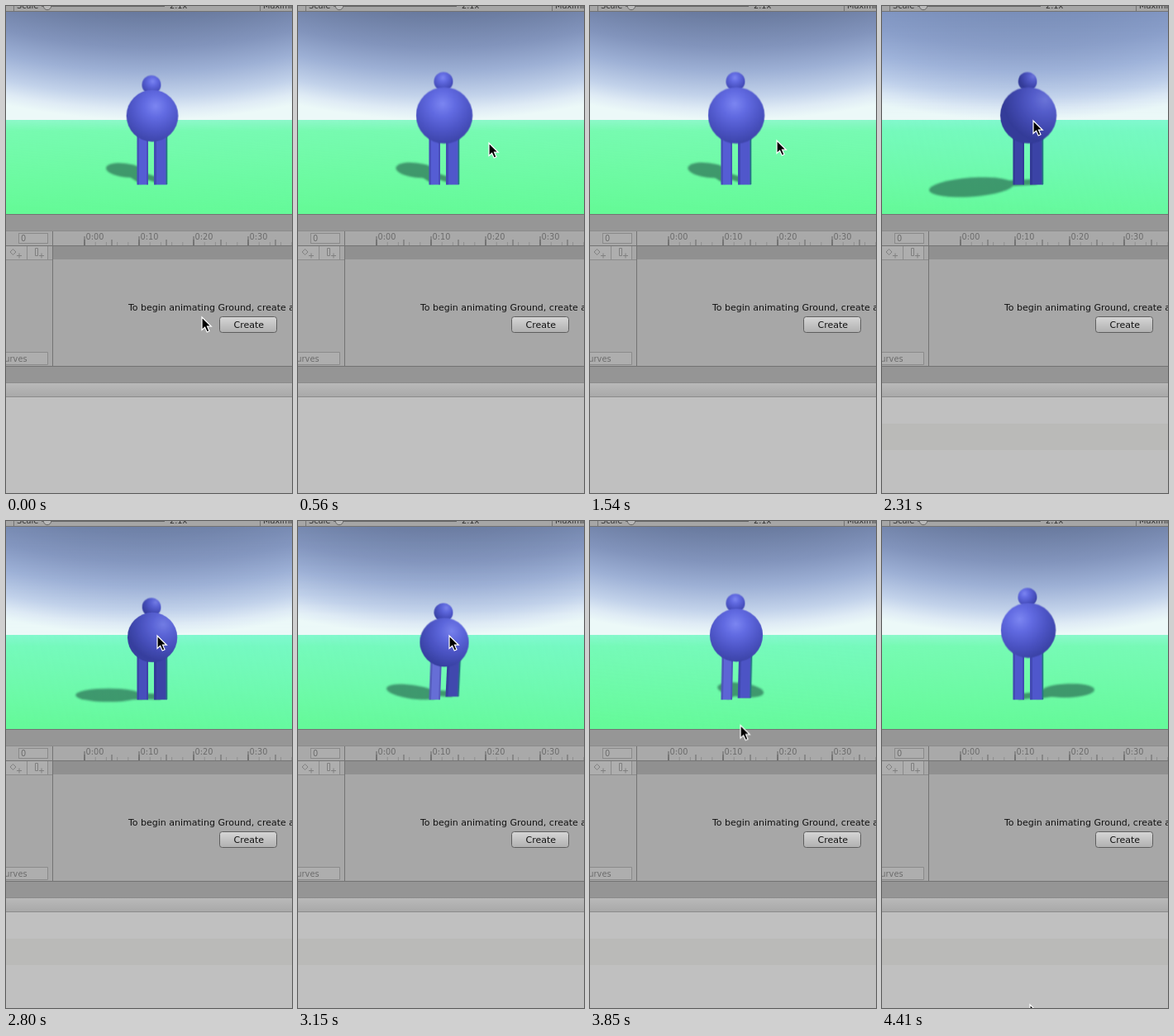
These frames come from a looping animation (346 px wide and 590 px high, 4480 ms). An HTML page:

```html
<!DOCTYPE html>
<html lang="en">
<head>
<meta charset="utf-8">
<title>Editor scene</title>
<style>
  html, body { margin: 0; width: 100%; height: 100%; overflow: hidden; background: #c0c0c0; }
  svg { display: block; width: 346px; height: 590px; }
  text { font: 9.8px "DejaVu Sans", sans-serif; fill: #6c6c6c; }
  text.top { fill: #333; }
  text.main { font-size: 11px; fill: #111; }
  .edge { stroke: #737373; }
  .thin { stroke: #8b8b8b; fill: none; }

  .move { animation: 4480ms linear infinite; }
  #body { animation-name: body; }
  #head { animation-name: head; }
  .glow { animation-name: glow; }
  .shade { animation-name: shade; }
  #legL { animation-name: legL; transform-origin: 165px 217px; }
  #legR { animation-name: legR; transform-origin: 187px 217px; }
  #blob { animation-name: blob; }
  #bars { animation-name: bars; }
  #haze { animation-name: haze; }
  #teal { animation-name: teal; }
  #cursor { animation-name: cursor; }
  #strip { animation-name: strip; animation-timing-function: step-end; }

  @keyframes body {
    0% { transform: translate(177px, 133px) scale(.98); }
    12.5%, 51.56% { transform: translate(177px, 132.5px) scale(1.07); }
    62.5% { transform: translate(177px, 141px) scale(.945); }
    76.56% { transform: translate(177px, 152px) scale(.915); }
    90%, 100% { transform: translate(177px, 132.5px) scale(1.04); }
  }
  @keyframes head {
    0% { transform: translate(176px, 95.5px); }
    12.5%, 51.56% { transform: translate(176px, 91.5px); }
    62.5% { transform: translate(176px, 104.5px); }
    76.56% { transform: translate(176px, 116px); }
    90%, 100% { transform: translate(176px, 92.5px); }
  }
  @keyframes glow {
    0% { transform: translate(4px, -12px); }
    12.5%, 37.5% { transform: translate(-2px, -13px); }
    51.56% { transform: translate(19px, -18px); }
    62.5% { transform: translate(14px, -17px); }
    76.56% { transform: translate(6px, -14px); }
    98.44%, 100% { transform: translate(-10px, -13px); }
  }
  @keyframes shade {
    0%, 37.5% { opacity: 0; }
    51.56% { opacity: .16; }
    62.5% { opacity: .08; }
    76.56%, 100% { opacity: 0; }
  }
  @keyframes legL {
    0%, 37.5% { transform: none; fill: #555dd4; }
    51.56% { transform: none; fill: #3b43a6; }
    62.5% { transform: none; fill: #474fbc; }
    76.56% { transform: skewX(-4deg); fill: #7f86ea; }
    90%, 100% { transform: none; fill: #4f57cc; }
  }
  @keyframes legR {
    0%, 37.5% { transform: none; fill: #5057cb; }
    51.56%, 62.5% { transform: none; fill: #3b43a6; }
    76.56% { transform: translate(-1px, -6.5px) skewX(-5deg); fill: #444cb4; }
    90%, 100% { transform: none; fill: #4f57cc; }
  }
  @keyframes blob {
    0% { transform: translate(144px, 199px) rotate(7deg) scale(.58, .8); }
    12.5%, 37.5% { transform: translate(143px, 199px) rotate(7deg) scale(.62, .85); }
    51.56% { transform: translate(108px, 219.5px) rotate(-4deg) scale(1.28, 1.1); }
    62.5% { transform: translate(124px, 211px) scale(1, .78); }
    76.56% { transform: translate(150px, 204px) rotate(14deg) scale(.63, .82); }
    98.44%, 100% { transform: translate(225px, 205.5px) rotate(-2deg) scale(.8, .8); }
  }
  @keyframes bars {
    0%, 37.5% { d: path("M165 213L144 199M187 212L146 199"); }
    51.56% { d: path("M165 214L120 218M187 213L120 217"); }
    62.5% { d: path("M165 213L124 211M187 213L126 211"); }
    76.56% { d: path("M165 213L150 204M186 207L152 203"); }
    98.44%, 100% { d: path("M165 213L222 207M187 212L222 207"); }
  }
  @keyframes haze {
    0%, 37.5% { opacity: 0; }
    51.56% { opacity: .4; }
    62.5% { opacity: .12; }
    76.56%, 100% { opacity: 0; }
  }
  @keyframes teal {
    0%, 37.5% { opacity: .35; }
    51.56%, 76.56% { opacity: 1; }
    98.44%, 100% { opacity: .5; }
  }
  @keyframes cursor {
    0% { transform: translate(237px, 377px); animation-timing-function: ease-in-out; }
    12.5%, 25% { transform: translate(231px, 166px); animation-timing-function: ease-in-out; }
    33%, 39% { transform: translate(226px, 163px); animation-timing-function: ease-in-out; }
    50%, 79.5% { transform: translate(183px, 139px); animation-timing-function: ease-in-out; }
    98.44%, 100% { transform: translate(179px, 586px); }
  }
  @keyframes strip {
    0% { opacity: 0; }
    50.7%, 100% { opacity: 1; }
  }
</style>
</head>
<body>
<svg viewBox="0 0 346 590">
  <defs>
    <!-- Centred far above the view, so the bands sag gently -->
    <radialGradient id="sky" gradientUnits="userSpaceOnUse" cx="173" cy="-700" r="838">
      <stop offset=".8425" stop-color="#68799d"/>
      <stop offset=".895" stop-color="#8294bc"/>
      <stop offset=".93" stop-color="#9db0d5"/>
      <stop offset=".965" stop-color="#c2d2ea"/>
      <stop offset=".985" stop-color="#dfebf5"/>
      <stop offset="1" stop-color="#ecf9f8"/>
    </radialGradient>
    <linearGradient id="hazeFade" x2="0" y2="1">
      <stop offset="0" stop-color="#94afe4"/>
      <stop offset="1" stop-color="#b4cbf0" stop-opacity="0"/>
    </linearGradient>
    <linearGradient id="ground" x2="0" y2="1">
      <stop offset="0" stop-color="#94f8c8"/>
      <stop offset=".12" stop-color="#78fbaa"/>
      <stop offset="1" stop-color="#64fa95"/>
    </linearGradient>
    <linearGradient id="tealFade" x1=".35" y1="1" x2=".65" y2="0">
      <stop offset="0" stop-color="#6cf8c8" stop-opacity=".1"/>
      <stop offset="1" stop-color="#74f8d4" stop-opacity=".6"/>
    </linearGradient>
    <linearGradient id="button" x2="0" y2="1">
      <stop offset="0" stop-color="#d6d6d6"/>
      <stop offset="1" stop-color="#b0b0b0"/>
    </linearGradient>
    <linearGradient id="bar" x2="0" y2="1">
      <stop offset="0" stop-color="#b9b9b9"/>
      <stop offset="1" stop-color="#a8a8a8"/>
    </linearGradient>
    <radialGradient id="light">
      <stop offset="0" stop-color="#7c86f2"/>
      <stop offset=".3" stop-color="#626be2"/>
      <stop offset=".65" stop-color="#4d55c6"/>
      <stop offset="1" stop-color="#3b43a6"/>
    </radialGradient>
    <clipPath id="ball"><circle r="32"/></clipPath>
    <clipPath id="view"><rect y="7" width="346" height="245"/></clipPath>
    <filter id="soft" x="-20%" y="-40%" width="140%" height="180%"><feGaussianBlur stdDeviation=".9"/></filter>
  </defs>

  <!-- Scene view -->
  <g clip-path="url(#view)">
    <rect y="6" width="346" height="133" fill="url(#sky)"/>
    <rect id="haze" class="move" y="6" width="346" height="133" fill="url(#hazeFade)"/>
    <rect y="138" width="346" height="114" fill="url(#ground)"/>
    <rect id="teal" class="move" y="138" width="346" height="114" fill="url(#tealFade)"/>
    <g opacity=".62" filter="url(#soft)" fill="#245c49">
      <ellipse id="blob" class="move" rx="40" ry="10.5"/>
      <path id="bars" class="move" d="M165 213L144 199M187 212L146 199" stroke="#245c49" stroke-width="7"/>
    </g>
    <g id="legR" class="move">
      <path d="M179 150h16v66.5h-16z"/>
      <path d="M179 150h3v66.5h-3z" fill="#1c2468" opacity=".25"/>
      <path d="M193.500 150h1.800v66h-1.800z" fill="#237782"/>
    </g>
    <g id="legL" class="move">
      <path d="M158.500 150h13.500v66.500h-13.500z"/>
      <path d="M158.500 150h2.500v66.500h-2.500zM170 150h2v66.500h-2z" fill="#1c2468" opacity=".25"/>
    </g>
    <g id="head" class="move">
      <g transform="scale(.36)" clip-path="url(#ball)">
        <circle r="32" fill="#3b43a6"/>
        <circle class="move glow" r="47" fill="url(#light)"/>
        <circle class="move shade" r="33" fill="#151c55"/>
      </g>
    </g>
    <g id="body" class="move">
      <g clip-path="url(#ball)">
        <circle r="32" fill="#3b43a6"/>
        <circle class="move glow" r="47" fill="url(#light)"/>
        <circle class="move shade" r="33" fill="#151c55"/>
      </g>
    </g>
  </g>

  <!-- Top toolbar -->
  <rect width="346" height="6" fill="#a6a6a6"/>
  <path class="edge" d="M0 6.500h346M9.500 0v6M307.500 0v6"/>
  <path d="M43 .5h149" stroke="#666"/>
  <circle cx="50" cy="0" r="4.700" fill="#b9b9b9" stroke="#666"/>
  <text class="top" x="-5" y="3">▾</text>
  <text class="top" x="13" y="3">Scale</text>
  <text class="top" x="198" y="3">2.1x</text>
  <text class="top" x="311" y="3">Maximize</text>

  <!-- Timeline -->
  <rect y="252" width="346" height="21" fill="#969696"/>
  <path class="edge" d="M0 252.500h346"/>
  <rect y="272" width="346" height="18" fill="#a9a9a9"/>
  <path class="thin" d="M0 272.500h346"/>
  <rect x="15.500" y="275.500" width="35" height="12" fill="#adadad" stroke="#8a8a8a"/>
  <text x="18" y="284.500">0</text>
  <g stroke="#666">
    <path d="M94.500 288h252" stroke-width="4" stroke-dasharray="1 12.200" opacity=".4"/>
    <path d="M94.500 286.500h252" stroke-width="7" stroke-dasharray="1 32"/>
    <path d="M94.500 284.500h252" stroke-width="11" stroke-dasharray="1 65"/>
  </g>
  <text x="96.500" y="283">0:00</text>
  <text x="162.500" y="283">0:10</text>
  <text x="228.500" y="283">0:20</text>
  <text x="294.500" y="283">0:30</text>
  <rect y="290" width="346" height="146" fill="#a7a7a7"/>
  <rect y="290" width="51" height="17" fill="#aeaeae"/>
  <rect x="57" y="290" width="289" height="17" fill="#909090"/>
  <rect y="420" width="50" height="15" fill="#aeaeae"/>
  <path class="edge" d="M0 290.500h346M56.500 273v163M0 436.500h346"/>
  <path class="thin" d="M0 307.500h56M25.500 291v16M50.500 291v16M0 419.500h50.500v15H0"/>
  <g fill="none" stroke="#808080">
    <path d="M5 298l3.500-3.500L12 298l-3.500 3.500zM13 302.500h6M16 299.500v6"/>
    <path d="M35.500 293.500h3v9h-3zM40 302.500h6M43 299.500v6"/>
  </g>
  <text x="-8.500" y="431">Curves</text>
  <text class="main" x="148" y="369">To begin animating Ground, create an Animation Clip.</text>
  <rect x="258.500" y="376.500" width="69" height="19" rx="3" fill="url(#button)" stroke="#5e5e5e"/>
  <text class="main" x="275.500" y="390">Create</text>

  <!-- Lower panel -->
  <rect y="437" width="346" height="20" fill="#959595"/>
  <rect y="457" width="346" height="17" fill="url(#bar)"/>
  <path class="thin" d="M0 456.500h346M0 473.500h346"/>
  <rect y="474" width="346" height="116" fill="#c0c0c0"/>
  <rect id="strip" class="move" y="506" width="346" height="32" fill="#babab8"/>

  <path id="cursor" class="move" d="M0 0V15.500L3.600 12.200 6.200 18 9 16.700 6.500 11.200H11.300Z"
        fill="#000" stroke="#fff" stroke-width="1.200"/>
</svg>
</body>
</html>
```
